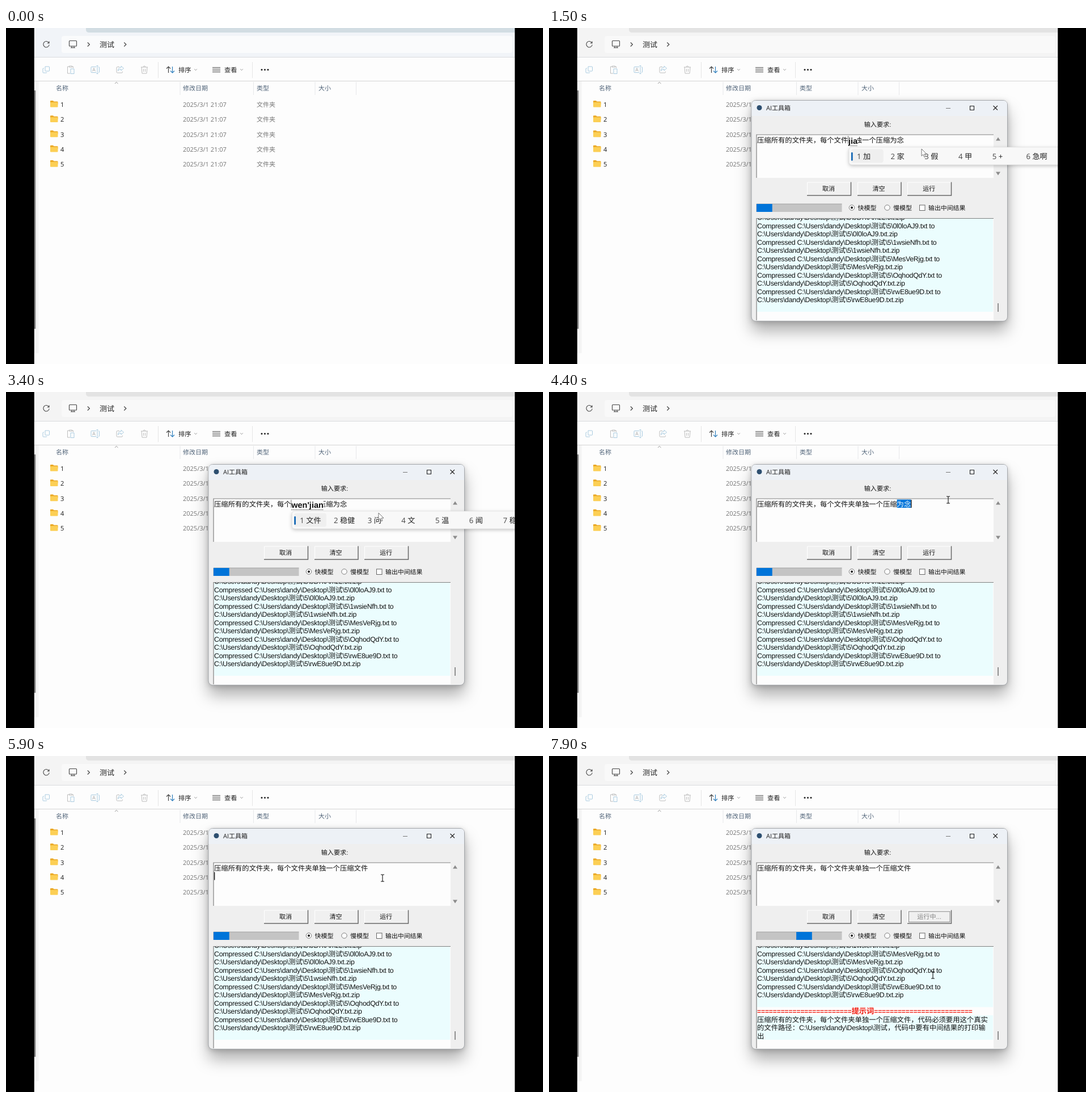
These frames come from a looping animation (947x592 px, 8 s). An HTML page:

```html
<!DOCTYPE html>
<html lang="zh-CN">
<head>
<meta charset="utf-8">
<title>AI工具箱</title>
<style>
  html, body { margin: 0; width: 100%; height: 100%; overflow: hidden; background: #000; }
  svg { display: block; width: 947px; height: 592px; }
  text {
    white-space: pre; text-rendering: geometricPrecision;
    font-family: "Open Sans", "Noto Sans CJK SC", "Noto Sans CJK", sans-serif;
  }
  .tk { font-family: "Liberation Sans", "Noto Sans CJK SC", "Noto Sans CJK", sans-serif; }
  .log { letter-spacing: -.26px; }
  .log tspan { letter-spacing: 0; }
</style>
</head>
<body>
<svg id="stage" viewBox="0 0 947 592" xmlns="http://www.w3.org/2000/svg"></svg>
<script>
const LOOP = 8000;
const BLUE = '#0074d9', INK = '#111', CYAN = '#ebfdfe';
const CHAR = 12.33, ROW = 14.47, LATIN = 12.35, TEXT_X = 367;

// Drawing helpers
const rect = (x, y, w, h, fill, more = '') =>
  `<rect x="${x}" y="${y}" width="${w}" height="${h}" fill="${fill}" ${more}/>`;
const path = (d, stroke, w = 1, fill = 'none', more = '') =>
  `<path d="${d}" stroke="${stroke}" stroke-width="${w}" fill="${fill}" ${more}/>`;
const text = (x, mid, size, str, fill = INK, more = '') =>
  `<text x="${x}" y="${mid + size * 0.37}" font-size="${size}" fill="${fill}" ${more}>${str}</text>`;
const tk = (x, mid, size, str, fill = INK, more = 'class="tk"') => text(x, mid, size, str, fill, more);
const centred = (x, mid, str, fill) => tk(x, mid, 11.1, str, fill, 'class="tk" text-anchor="middle"');
const move = (x, y, body) => `<g transform="translate(${x} ${y})">${body}</g>`;
// Chinese runs have their own size beside Latin ones
const mixed = (str, size = CHAR) =>
  str.replace(/[\u3000-\u9fff\uff00-\uffef]+/g, run => `<tspan font-size="${size}">${run}</tspan>`);
const clamp = v => Math.max(0, Math.min(1, v));
const ease = v => v * v * (3 - 2 * v);

// File manager
function chrome(active) {
  const bar = active ? '#f1f4f8' : '#f4f4f4';
  const tab = active ? '#d2dde3' : '#e3e3e3';
  const field = active ? '#fafbfc' : '#f9f9f9';
  return rect(49, 0, 849, 51, bar) +
    path('M141 0H898V8H147Q141 8 141 3Z', 'none', 0, tab) +
    rect(98, 14, 795, 30, field, 'rx="4"') +
    path('M75.6 26.2A5.2 5.2 0 1 0 76.2 29.5M76 23.6V26.7H72.8', '#444', 1.1) +
    path('M112.5 22.5H123.5Q124.5 22.5 124.5 23.5V31Q124.5 32 123.5 32H112.5Q111.5 32 111.5 31V23.5Q111.5 22.5 112.5 22.5ZM116 32V34.5M120 32V34.5M114 34.8H122', '#444', 1.1) +
    path('M143.8 25.5L147.4 29L143.8 32.5M208.3 25.5L211.9 29L208.3 32.5', '#444', 1.2) +
    text(165, 29, 13, '测试', '#222');
}

function folder(y) {
  return path(`M78 ${y - 5.5}Q78 ${y - 6.5} 79 ${y - 6.5}H83L84.5 ${y - 5}H90.5Q91.5 ${y - 5} 91.5 ${y - 4}V${y}H78Z`, 'none', 0, '#eba926') +
    rect(78, y - 3.5, 13.5, 8.7, '#fccf55', 'rx="1"');
}

function toolbar() {
  const pale = '#a9cbe0', grey = '#bdbdbd';
  const icons = [
    [71, path('M-2 -5.5H4.5Q5.5 -5.5 5.5 -4.5V1.5Q5.5 2.5 4.5 2.5H-1Q-2 2.5 -2 1.5Z', pale) +
      path('M-4 -2.5H-5Q-6 -2.5 -6 -1.5V4.5Q-6 5.5 -5 5.5H0Q1 5.5 1 4.5', pale)],
    [114, path('M-2 -5.5H-5.5V6.5H-1M2 -5.5H4.5V-3M-2.5 -6.5H2.5V-4.5H-2.5Z', grey) + path('M0 -1.5H6V7H0Z', pale)],
    [157, path('M2 -5H-6Q-7 -5 -7 -4V4Q-7 5 -6 5H2M6 -5Q7.5 -5 7.5 -3.5V3.5Q7.5 5 6 5M2.5 -7H5.5M4 -7V7M2.5 7H5.5', pale) +
      path('M-4.5 3L-2 -3L.5 3M-3.7 1H-.3', grey)],
    [201, path('M-1 -5H-4.5Q-6 -5 -6 -3.5V4Q-6 5.5 -4.5 5.5H3Q4.5 5.5 4.5 4V3', grey) +
      path('M2 -6.5L6.5 -2.5L2 1.5V-.8Q-2 -1 -3.5 2Q-3 -4 2 -4.2Z', pale)],
    [244, path('M-6 -4.5H6M-2 -4.5Q-2 -6.5 0 -6.5Q2 -6.5 2 -4.5M-5 -4.5L-4 6.5H4L5 -4.5M-1.5 -1.5V3.5M1.5 -1.5V3.5', grey)]
  ];
  const drop = x => path(`M${x - 2.3} 72.3L${x} 74.6L${x + 2.3} 72.3`, '#8a8a8a', .9);
  return icons.map(([x, body]) => move(x, 73.5, body)).join('') +
    path('M268.5 60V88M434.5 60V88', '#e5e5e5') +
    path('M286.5 79V68M283 71.5L286.5 68L290 71.5', '#444', 1.2) +
    path('M293.5 68V79M290 75.5L293.5 79L297 75.5', '#2f7fbd', 1.2) +
    text(304, 73.5, 11.2, '排序', '#222') + drop(334.5) +
    path('M364 69.5H378M364 72.2H378M364 74.9H378M364 77.6H378', '#555', 1) +
    text(385, 73.5, 11.2, '查看', '#222') + drop(415.5) +
    [451, 456.5, 462].map(x => `<circle cx="${x}" cy="73.5" r="1.5" fill="#222"/>`).join('');
}

function explorer() {
  const heads = [[88, '名称'], [312, '修改日期'], [442, '类型'], [551, '大小']];
  let out = rect(49, 51, 849, 541, '#fdfdfd') +
    path('M49 51.5H898', '#d9dcde') + path('M49 93.5H898', '#d4d4d4') +
    rect(50, 94, 7.5, 479, '#f4f4f4') + rect(49, 110, 3.4, 420, '#858585') + toolbar() +
    path('M192 98L194.7 95.4L197.4 98', '#888', .9) +
    path('M307 95V118M436.5 95V118M545 95V118M617.5 95V118', '#e6e8ea') +
    heads.map(([x, s]) => text(x, 106, 11, s, '#52657a')).join('');
  for (let i = 0; i < 5; i++) {
    const y = 135 + i * 26.3;
    out += folder(y - .6) + text(96, y, 11.2, i + 1, '#1a1a1a') +
      text(312, y, 11, '2025/3/1 21:07', '#747474') + text(442, y, 11, '文件夹', '#747474');
  }
  return out;
}

// Tool window
const sunken = (x, y, w, h, fill) => rect(x, y, w, h, fill) +
  path(`M${x} ${y + h}V${y + .5}H${x + w}`, '#808080', 1.2);

function raised(x, w) {
  return rect(x, 271.5, w, 24, '#f0f0f0') +
    path(`M${x + .5} 295V272H${x + w}`, '#fff', 1) +
    path(`M${x} 295H${x + w - .5}V271.5`, '#696969', 1.5);
}

const shadow = (dy, opacity, blur) =>
  rect(357, 127 + dy, 451.5, 389.5, '#000', `rx="8" fill-opacity="${opacity}" filter="url(#${blur})"`);

function panel() {
  return shadow(18, .3, 'soft') + shadow(2, .2, 'close') +
    rect(357, 127.5, 451.5, 389, '#efefef', 'rx="7.5" stroke="#a4a7ab" stroke-width="1"') +
    path('M357.5 155V135Q357.5 128 364.5 128H801Q808 128 808 135V155Z', 'none', 0, '#edf1f6') +
    '<circle cx="371" cy="140.5" r="4.5" fill="#2d4f70"/>' +
    text(383, 141, 11, 'AI工具箱', '#222') +
    path('M700 141.5H708', '#777') + path('M742.5 137.5H749.5V144.5H742.5ZM783.5 137L791 144.5M791 137L783.5 144.5', '#222', 1.1) +
    centred(579.5, 170, '输入要求:') +
    sunken(366, 187.5, 418, 76.5, '#fdfdfd') +
    path('M788 198.5L792 192.5L796 198.5ZM788 253.5L792 259.5L796 253.5Z', 'none', 0, '#8c8c8c') +
    raised(455, 78) + raised(544, 77.5) +
    centred(493, 283, '取消') + centred(581.5, 283, '清空') +
    [534, 596.5].map(x => `<circle cx="${x}" cy="316.5" r="4.7" fill="#fff" stroke="#777"/>`).join('') +
    '<circle cx="534" cy="316.5" r="2" fill="#111"/>' +
    tk(544.5, 317, 11, '快模型') + tk(607, 317, 11, '慢模型') +
    rect(653.5, 312, 9.5, 9.5, '#fff', 'stroke="#666"') +
    tk(669, 317, 10.9, '输出中间结果') +
    sunken(366, 335, 418, 180, '#fdfdfd') + rect(367, 336, 416, 164, CYAN) +
    path('M792 485V500', '#777', 1.6);
}

const HOME = 'C:\\Users\\dandy\\Desktop\\测试';
const FILES = ['0B7kAmzL', '0l0loAJ9', '1wsieNfh', 'MesVeRjg', 'OqhodQdY', 'rwE8ue9D'];
const LOG = [...FILES.flatMap(f => {
  const p = `${HOME}\\5\\${f}.txt`;
  return [`Compressed ${p} to`, `${p}.zip`];
}), ''];
const PROMPT = ['='.repeat(24) + '提示词' + '='.repeat(25),
  '压缩所有的文件夹，每个文件夹单独一个压缩文件，代码必须要用这个真实',
  `的文件路径：${HOME}，代码中要有中间结果的打印输`, '出'];

function logView(running) {
  const lines = running ? LOG.concat(PROMPT) : LOG;
  const rows = lines.map((line, i) => {
    const y = 493 - (lines.length - 1 - i) * ROW;
    if (y < 325) return '';
    if (line[0] !== '=') return tk(TEXT_X, y, LATIN, mixed(line), INK, 'class="tk log"');
    return rect(TEXT_X, y - 7.2, 416, ROW, '#fdfdfd') +
      tk(TEXT_X, y, 11.9, mixed(line, 13.2), '#f01c10', 'class="tk" font-weight="bold"');
  });
  return `<g clip-path="url(#log)">${rows.join('')}</g>`;
}

// Typing: time, text after the fixed opening, letters being composed
const OPENING = '压缩所有的文件夹，每个', MIDDLE = '单独一个压缩';
const COMMIT = 5100, LINE_CLICK = 5480, RUN = 6500;
const EDITS = [
  [0, '文件', ''], [1150, '文件', 'j'], [1250, '文件', 'ji'], [1350, '文件', 'jia'],
  [1750, '文件', ''], [1900, '文', ''], [2050, '', ''],
  [2200, '', 'm'], [2300, '', 'mu'], [2400, '', "mu'l"], [2500, '', "mu'lu"], [2850, '', ''],
  [3000, '', 'w'], [3100, '', 'wen'], [3250, '', "wen'jian"], [3450, '', "wen'jian'jia"],
  [3600, '文件夹', ''], [4700, '文件夹', 'w'], [4800, '文件夹', 'wen'],
  [4950, '文件夹', "wen'jian"], [COMMIT, '文件夹', '']
];
const CHOICES = {
  j: '就 级 将 家 及 今 加', ji: '几 及 级 集 机 即 记', jia: '加 家 假 甲 + 急啊 价',
  m: '吗 没 们 每 买 慢 面', mu: '目 木 母 姆 亩 幕 墓', "mu'l": '目录 木料 木 目 姆 母 穆',
  "mu'lu": '目录 母鹿 木 目 姆 母 穆', w: '我 为 无 问 万 五 位', wen: '问 文 温 闻 稳 吻 纹',
  "wen'jian": '文件 稳健 问 文 温 闻 稳', "wen'jian'jia": '文件夹 文件 稳健 问 文 温 闻'
};
const GLYPH = { m: .889, u: .611, "'": .238, w: .778, e: .556, n: .611, a: .556 };
const typedWidth = s => 14.5 * [...s].reduce((sum, c) => sum + (GLYPH[c] || .278), 0);

function popup(x, typed) {
  const w = typedWidth(typed);
  const slot = word => Math.max(59.7, word.length * 13.2 + 33);
  const words = CHOICES[typed].split(' ');
  let at = x + 15;
  const items = words.map((word, i) => {
    const item = text(at, 226.5, 13.2, i + 1, '#444') + text(at + 11, 226.5, 13.2, word, '#222');
    at += slot(word);
    return item;
  });
  return rect(x, 189, w, 20, '#fdfdfd') + tk(x, 198.5, 14.5, typed, INK, 'class="tk" font-weight="bold"') +
    path(`M${x} 207.5H${x + w}`, '#333', 1, 'none', 'stroke-dasharray="1.3 1.3"') +
    rect(x + 1, 212, 500, 31, '#000', 'rx="5" fill-opacity=".24" filter="url(#faint)"') +
    rect(x + 1, 210, 500, 31, '#f8f8f8', 'rx="5" stroke="#dedede" stroke-width=".7"') +
    rect(x + 5, 213.5, slot(words[0]) - 3, 24, '#efefef', 'rx="4"') +
    rect(x + 5, 219, 2.8, 15, '#1267b4', 'rx="1.4"') + items.join('');
}

// Pointer: time, x, y
const TRACK = [[400, 540, 500], [650, 553, 197], [900, 553, 197], [1000, 528, 197], [1050, 528, 197],
  [1350, 657, 213], [3650, 657, 213], [3950, 614, 197], [4000, 614, 197], [4250, 704, 190],
  [5150, 704, 190], [5450, 664, 215], [6000, 664, 215], [6350, 672, 285], [6750, 672, 285], [7250, 677, 386]];

function pointerAt(t) {
  const next = TRACK.findIndex(p => p[0] > t);
  if (next < 0) return TRACK[TRACK.length - 1].slice(1);
  if (next === 0) return null;
  const [a, b] = [TRACK[next - 1], TRACK[next]];
  const k = ease((t - a[0]) / (b[0] - a[0]));
  return [a[1] + (b[1] - a[1]) * k, a[2] + (b[2] - a[2]) * k];
}

function pointer([x, y], popupX) {
  const covered = popupX && x > popupX && y >= 210 && y <= 241;
  const inBox = x > 366 && x < 784 && ((y > 188 && y < 264) || (y > 335 && y < 515));
  return move(x.toFixed(1), y.toFixed(1), inBox && !covered
    ? path('M-3 -6H-1Q0 -6 0 -5Q0 -6 1 -6H3M0 -5V5M-3 6H-1Q0 6 0 5Q0 6 1 6H3', '#111', 1.1)
    : path('M0 0V12.5L2.9 9.8L4.9 14.6L7 13.7L5 9.1H9Z', '#666', .9, '#fff'));
}

function inputView(t) {
  const [editTime, mid, typed] = EDITS.filter(e => e[0] <= t).pop();
  const line = OPENING + mid + MIDDLE + (t < COMMIT ? '为念' : '文件');
  const end = line.length, pos = pointerAt(t);
  let out = tk(TEXT_X, 197, CHAR, line), caret = OPENING.length + mid.length;
  if (t < 1000) out += rect(TEXT_X, 204, 415.5, 14.3, BLUE);
  if (t >= 4000) {
    caret = end;
    if (t < COMMIT) {
      caret = Math.max(end - 2, Math.min(end, Math.round((pos[0] - TEXT_X) / CHAR)));
      const x = TEXT_X + (end - 2) * CHAR;
      out += rect(x, 189.5, (caret - end + 2) * CHAR, 14.5, BLUE) +
        tk(x, 197, CHAR, line.slice(end - 2, caret), '#fff');
    }
  }
  const second = t >= LINE_CLICK;
  const last = Math.max(editTime, ...[1000, 4000, 4250, LINE_CLICK].filter(c => c <= t));
  const caretX = TEXT_X + (second ? 0 : caret * CHAR);
  if (t >= 1000 && (t - last) % 900 < 600)
    out += rect(caretX, second ? 204.5 : 190, 1.3, 14, '#111');
  const popupX = typed ? caretX + .6 : 0;
  return { out, popup: typed ? popup(popupX, typed) : '', popupX, pos };
}

function controls(t) {
  const running = t >= RUN;
  const shift = running ? (t - RUN) * .05 : 0;
  const label = running
    ? rect(634.5, 274, 72.5, 18.5, 'none', 'stroke="#8a8a8a"') + centred(670.5, 283, '运行中...', '#808080')
    : centred(670, 283, '运行');
  return raised(632, 78) + label + rect(366, 310, 150.5, 14, '#c4c4c4') +
    path('M366 324V310H516.5', '#a2a2a2') + rect((366 + shift).toFixed(1), 310, 27.7, 14, BLUE);
}

// Stage layers
const blurs = [['soft', 14], ['close', 5], ['faint', 3]].map(([id, size]) =>
  `<filter id="${id}" x="-20%" y="-60%" width="140%" height="220%"><feGaussianBlur stdDeviation="${size}"/></filter>`);
const stage = document.getElementById('stage');
stage.innerHTML = `<defs>${blurs.join('')}
  <clipPath id="log"><rect x="366" y="336" width="418" height="179"/></clipPath></defs>
  ${explorer()}<g id="chrome"></g>
  <g id="window">${panel()}<g id="logs"></g><g id="controls"></g><g id="input"></g></g>
  <g id="overlay"></g>${rect(0, 0, 49.8, 592, '#000')}${rect(897.3, 0, 49.7, 592, '#000')}`;
const layer = id => document.getElementById(id);
const drawn = {};
function put(id, body) {
  if (drawn[id] !== body) layer(id).innerHTML = drawn[id] = body;
}

const OPEN = 200;
function render(t) {
  const k = ease(clamp((t - OPEN) / 200)), scale = .92 + .08 * k;
  const win = layer('window');
  win.setAttribute('opacity', k);
  win.setAttribute('transform', `translate(582.5 322) scale(${scale}) translate(-582.5 -322)`);
  const input = inputView(t);
  put('chrome', chrome(t < OPEN));
  put('logs', logView(t >= RUN + 150));
  put('controls', controls(t));
  put('input', input.out);
  put('overlay', input.popup + (input.pos ? pointer(input.pos, input.popupX) : ''));
}

const start = performance.now();
function tick() {
  render((performance.now() - start) % LOOP);
  requestAnimationFrame(tick);
}
tick();
</script>
</body>
</html>
```
